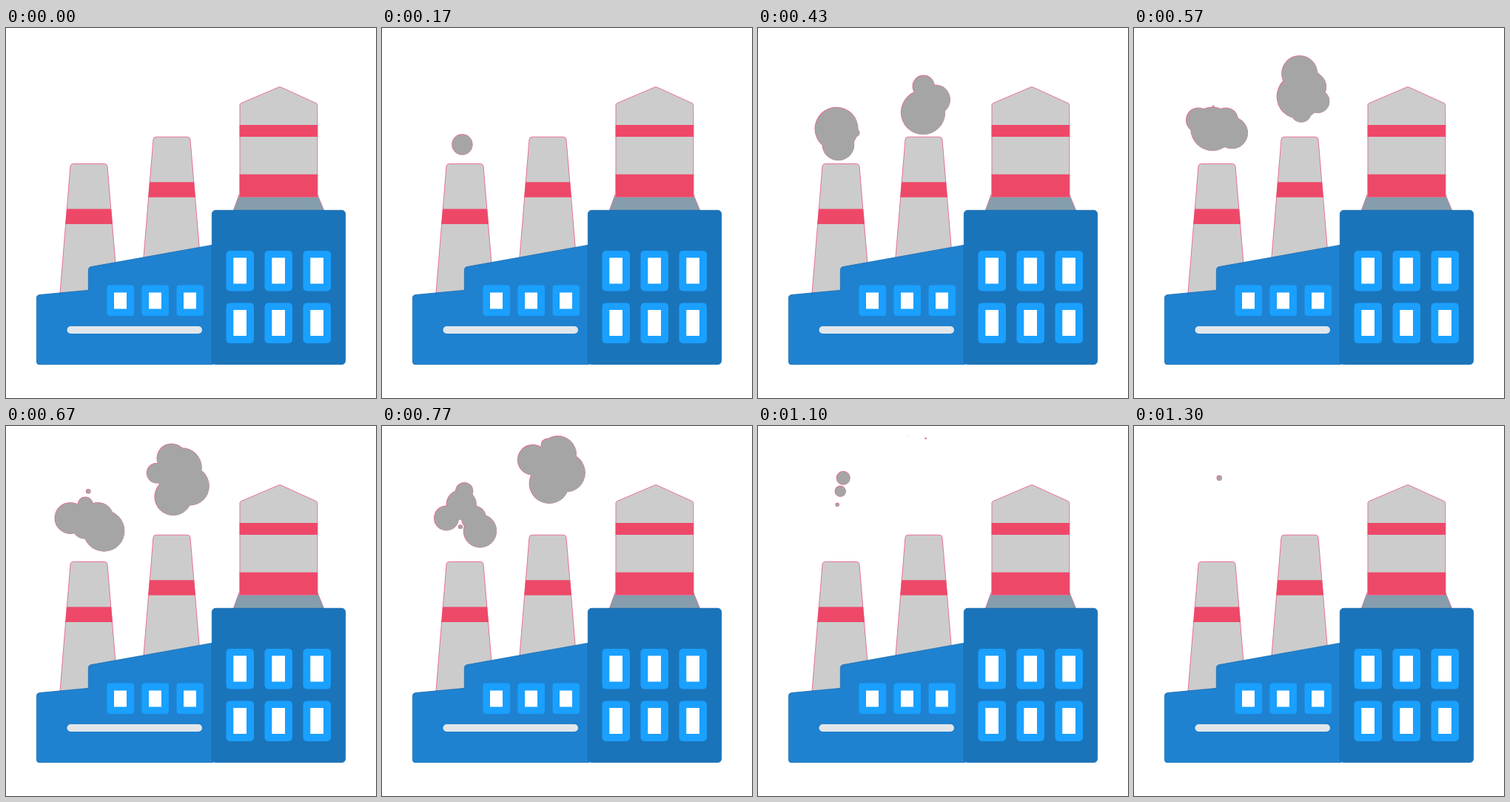
These frames come from a looping animation (500x500 px, 1.33 s). An HTML page:

```html
<!DOCTYPE html>
<html lang="en">
<head>
<meta charset="utf-8">
<title>Factory</title>
<style>
  html, body { margin: 0; width: 100%; height: 100%; overflow: hidden; background: #fff; }
  svg { display: block; width: 100%; height: 100%; }
  .band { fill: #ee4869; }
  .wall { fill: #ccc; stroke: #e8668a; stroke-width: .9; stroke-linejoin: round; }
  .house { stroke: #1768ad; stroke-width: .7; }
  .frame { fill: #1aa0ff; }
  .glass { fill: #fff; }
  #rim { fill: #e5668a; }
  #smoke { fill: #a5a5a5; }
</style>
</head>
<body>
<svg viewBox="0 0 500 500">
  <defs>
    <g id="chimney">
      <path class="wall" d="M73 358 L87 187 Q87.4 183.5 91 183.5 H133 Q136.6 183.5 137 187 L151.3 358 Z"/>
      <path class="band" d="M82 244.5 H142.1 L143.9 265 H80.3 Z"/>
    </g>
    <g id="small">
      <rect class="frame" x="136.5" y="347.5" width="36.5" height="41.5" rx="4"/>
      <rect class="glass" x="146" y="357.5" width="17" height="22"/>
    </g>
    <g id="large">
      <rect class="frame" x="297.5" y="301" width="37.5" height="54.5" rx="5"/>
      <rect class="glass" x="307.3" y="310.5" width="17.7" height="35"/>
    </g>
    <g id="row">
      <use href="#large"/>
      <use href="#large" x="52"/>
      <use href="#large" x="104"/>
    </g>
  </defs>

  <g id="rim"></g>
  <g id="smoke"></g>

  <use href="#chimney"/>
  <use href="#chimney" x="112" y="-36.3"/>

  <path class="wall" d="M316 228 V104 Q316 102.5 317.5 101.7 L368.5 80 Q370 79.3 371.5 80 L419.3 101.7 Q420.8 102.5 420.8 104 V228 Z"/>
  <path class="band" d="M315.6 131 H421.2 V147 H315.6 Z M315.6 197.8 H421.2 V228.6 H315.6 Z"/>
  <path fill="#859dac" stroke="#e8668a" stroke-width=".6" d="M315 225 V228.5 H421 V225 L430 247 H307 Z"/>

  <path class="house" fill="#1e82d0" d="M45 454.7 Q41.3 454.7 41.3 451 V365 Q41.3 361 45 360.5 L111.3 354.3 V327 Q111.3 323.3 115 322.6 L280 293 V454.7 Z"/>
  <rect class="house" fill="#1a74ba" x="278.3" y="246.3" width="180.4" height="208.4" rx="5"/>
  <rect fill="#e1e6ea" x="82.5" y="403" width="182.5" height="10" rx="5"/>
  <use href="#small"/>
  <use href="#small" x="47"/>
  <use href="#small" x="94"/>
  <use href="#row"/>
  <use href="#row" y="70.5"/>
</svg>
<script>
  const LOOP = 1330, STEPS = 40, HALF_LIFE = 330;
  const RISE_START = 470, RISE_SPEED = .18, RISE_MAX = 85;
  const puffs = [];

  const addCircle = id => document.getElementById(id).appendChild(
    document.createElementNS('http://www.w3.org/2000/svg', 'circle'));

  // A puff swells to radius `size` at time `peak`, then shrinks away
  function puff(x, y, size, peak, lift = () => 0) {
    puffs.push({ x, y, size, peak, lift, rim: addCircle('rim'), body: addCircle('smoke') });
  }

  const rise = t => Math.min(RISE_MAX, Math.max(0, t - RISE_START) * RISE_SPEED);
  const earlyRise = t => t < RISE_START ? (t - RISE_START) * .1125 : rise(t);

  // Left cloud: hangs in place and thins into a plume
  puff(108.7, 157.7, 28, 330);
  puff(106.3, 136.5, 32.8, 500);
  puff(132.7, 142, 28, 670);
  for (const side of [-1, 1]) puff(105.8 + 18.5 * side, 124.7, 21.5, 665);
  for (let i = 0; i < 3; i++) {
    puff(107.5 + 4 * i, 106.5 - 18 * i, 23.5 - 3.5 * i * i, 840 + 67 * i * i);
  }

  // Right cloud: a first burst, then a ring of puffs, all drifting up
  puff(223.3, 110, 33.5, 500, earlyRise);
  puff(240, 97, 22.5, 500, rise);
  puff(224, 79, 24.6, 573, rise);
  for (let i = 0; i < 3; i++) {
    const a = 1.7 - 1.41 * i;
    puff(228.8 + 20.7 * Math.cos(a), 110.5 + 20.7 * Math.sin(a), 28, 730 - 15 * i, rise);
  }
  puff(204, 99, 21.4, 798, rise);
  puff(227, 102, 15, 830, rise);

  function place(circle, x, y, r) {
    circle.setAttribute('cx', x);
    circle.setAttribute('cy', y);
    circle.setAttribute('r', Math.max(0, r));
  }

  function draw(t) {
    for (const { x, y, size, peak, lift, rim, body } of puffs) {
      const phase = Math.min(1, Math.abs(t - peak) / HALF_LIFE);
      const r = size * (1 + Math.cos(Math.PI * phase)) / 2;
      const cy = y - lift(t);
      place(rim, x - .3, cy - .3, r > .4 ? r : 0);
      place(body, x, cy, r - .5);
    }
  }

  const start = performance.now();
  function tick() {
    const t = (performance.now() - start) % LOOP;
    const step = Math.floor((t + 4) / LOOP * STEPS);
    draw(Math.min(step, STEPS - 1) * LOOP / STEPS);
    requestAnimationFrame(tick);
  }
  tick();
</script>
</body>
</html>
```
